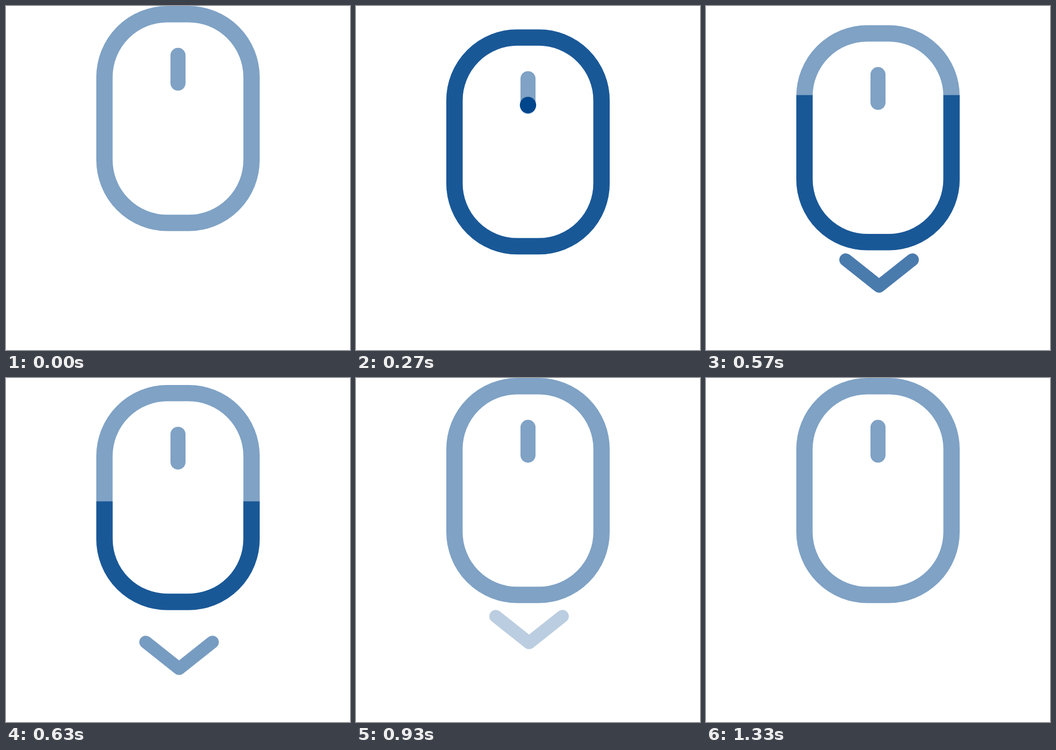
Animation, 640 px wide and 640 px high, one loop 1.43 s. Source, as an HTML page with a canvas:

```html
<!DOCTYPE html>
<html>
<head>
<meta charset="utf-8">
<style>
  html, body { margin: 0; height: 100%; overflow: hidden; background: #fff; }
  canvas { display: block; }
</style>
</head>
<body>
<canvas id="stage" width="640" height="640"></canvas>
<script>
const ctx = document.getElementById('stage').getContext('2d');
const LOOP = 1430, INK = '#00468c';
const clamp = x => Math.min(1, Math.max(0, x));
const easeInOut = x => {
  const a = clamp(x) ** 2.5, b = (1 - clamp(x)) ** 2.5;
  return a / (a + b);
};

// Motion runs at 25 steps per second, shown on a 30 Hz clock rounded to 10 ms.
function stepAt(ms) {
  const rest = ms % 100;
  const tick = 3 * Math.floor(ms / 100) + (rest >= 30) + (rest >= 70);
  return Math.min(33, tick - Math.floor((tick + 3) / 6));
}

function strokeBody(alpha) {
  ctx.globalAlpha = alpha;
  ctx.lineWidth = 30.4;
  ctx.beginPath();
  ctx.roundRect(183.2, 15.2, 273.6, 388.3, 117);
  ctx.stroke();
}

function drawMouse(n) {
  ctx.save();
  ctx.translate(0, 48.7 * easeInOut(1 - Math.abs(n - 10) / 10));
  strokeBody(0.5);

  ctx.beginPath();
  ctx.roundRect(306, 77.8, 28, 79.7, 14);
  ctx.fill();

  if (n < 10) {
    ctx.globalAlpha = clamp(n / 3) * clamp((10 - n) / 3);
    ctx.beginPath();
    ctx.arc(320, 93 + 53.5 * easeInOut(n / 10), 15.2, 0, 2 * Math.PI);
    ctx.fill();
  }

  // Dark band: fills from the top, then drains from the top.
  const top = Math.max(0, 43.3 * (n - 11));
  const bottom = Math.min(419, 63.65 * n);
  if (bottom > top) {
    ctx.beginPath();
    ctx.rect(160, top, 320, bottom - top);
    ctx.clip();
    strokeBody(0.8);
  }
  ctx.restore();
}

function drawArrow(n) {
  const age = (n - 10) % 12;
  if (n < 10 || age > 10) return;
  const y = 433.8 + 9.6 * age;
  ctx.globalAlpha = 0.8 * Math.min(age / 3, (12 - age) / 9);
  ctx.lineWidth = 24;
  ctx.beginPath();
  ctx.moveTo(260, y);
  ctx.lineTo(322, y + 49.2);
  ctx.lineTo(384, y);
  ctx.stroke();
}

function draw(now) {
  const n = stepAt(now % LOOP);
  ctx.globalAlpha = 1;
  ctx.clearRect(0, 0, 640, 640);
  ctx.fillStyle = ctx.strokeStyle = INK;
  ctx.lineCap = ctx.lineJoin = 'round';
  drawMouse(n);
  drawArrow(n);
}

const start = performance.now();
function loop() {
  draw(performance.now() - start);
  requestAnimationFrame(loop);
}
loop();
</script>
</body>
</html>
```
